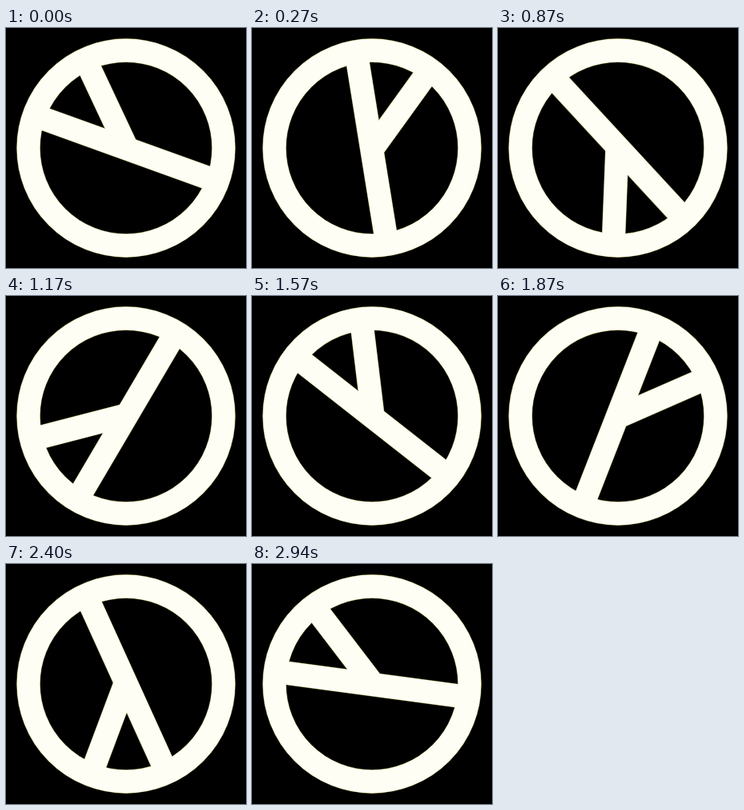
An HTML page for the animation above (2980 ms loop, 300x300 px).

```html
<!DOCTYPE html>
<html lang="en">
<head>
<meta charset="utf-8">
<title>Spinning ring</title>
<style>
  html, body { margin: 0; width: 100%; height: 100%; overflow: hidden; background: #000; }
  svg { display: block; width: 100%; height: 100%; }
</style>
</head>
<body>
<svg viewBox="0 0 300 300">
  <defs>
    <g id="wheel" fill="none">
      <circle r="122"/>
      <g id="spokes">
        <path d="M-120 -0.5H120"/>
        <path d="M0 1.1H120" transform="rotate(45)"/>
      </g>
    </g>
  </defs>
  <g transform="translate(150 150)">
    <use href="#wheel" stroke="#808030" stroke-width="29.8"/>
    <use href="#wheel" stroke="#fffef5" stroke-width="28.8"/>
  </g>
</svg>
<script>
  const LOOP = 2980;
  const POSES = 59;
  const START_ANGLE = 199.8;
  const TICK = 33.4;
  const LAST_TICK = 88;
  const spokes = document.getElementById("spokes");

  // Two new poses every three ticks; two full turns per loop.
  function draw(time) {
    const tick = Math.min(Math.floor((time + 6) / TICK), LAST_TICK);
    const pose = Math.floor(tick * 2 / 3);
    spokes.setAttribute("transform", `rotate(${START_ANGLE + pose * 720 / POSES})`);
  }

  const start = performance.now();
  function loop() {
    draw((performance.now() - start) % LOOP);
    requestAnimationFrame(loop);
  }
  draw(0);
  requestAnimationFrame(loop);
</script>
</body>
</html>
```
